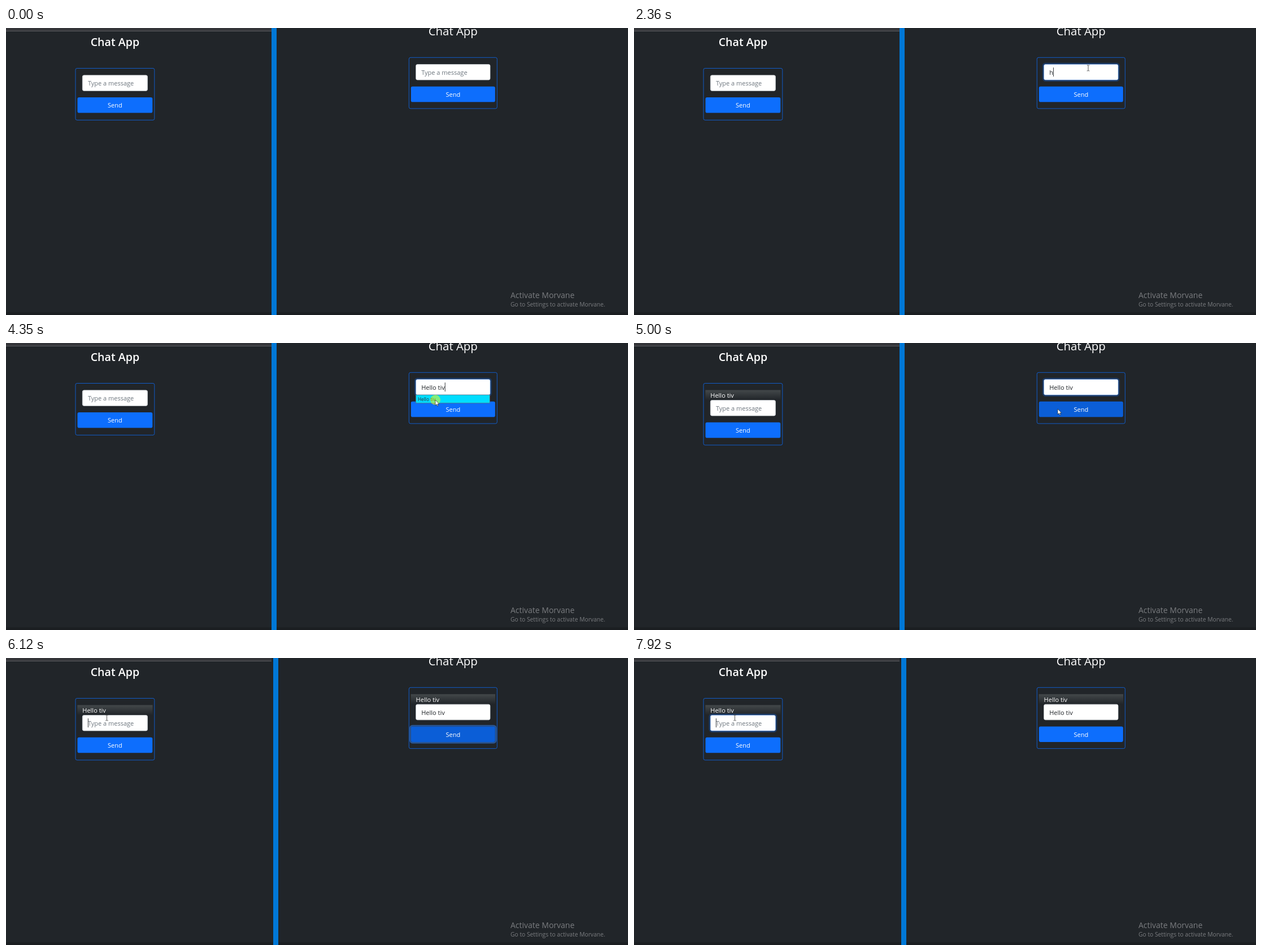
Recreate the animation shown at these times as an HTML page. Size 1101 px wide and 509 px high, loop 8000 ms.

```html
<!DOCTYPE html>
<html lang="en">
<head>
<meta charset="utf-8">
<title>Chat App</title>
<style>
  html, body { margin: 0; width: 100%; height: 100%; overflow: hidden; background: #212529; }
  svg { display: block; width: 100%; height: 100%; font-family: "Open Sans", "Noto Sans", sans-serif; }
  text { white-space: pre; }
</style>
</head>
<body>
<svg id="stage" viewBox="0 0 1101 509" preserveAspectRatio="none">
  <defs>
    <linearGradient id="fade" x1="0" y1="0" x2="0" y2="1">
      <stop offset="0" stop-color="#43484a"/>
      <stop offset="1" stop-color="#212529"/>
    </linearGradient>
  </defs>
</svg>
<script>
const LOOP = 8000;
const SHIFT = 17.7;
const ROW = 14.7;
const GREETING = "Hello tiv";
const HISTORY = ["how are you?", "hi", GREETING, "how is it going?", "hi there", "have a nice day"];
const stage = document.getElementById("stage");

function set(node, attrs) {
  for (const key in attrs) node.setAttribute(key, attrs[key]);
  return node;
}
function add(parent, tag, attrs = {}) {
  return parent.appendChild(set(document.createElementNS("http://www.w3.org/2000/svg", tag), attrs));
}
function rect(parent, x, y, width, height, attrs) {
  return add(parent, "rect", { x, y, width, height, ...attrs });
}
function label(parent, x, y, size, fill, content, attrs = {}) {
  const node = add(parent, "text", { x, y, "font-size": size, fill, ...attrs });
  node.textContent = content;
  return node;
}
function show(node, visible) {
  node.setAttribute("display", visible ? "inline" : "none");
}

// One chat form; x, y, w, h is its outline, top is the y of the input.
function makePane({ x, y, w, h, top, titleY, titleSize, weight }) {
  const mid = x + w / 2, inX = x + 12.3, inW = w - 24.6, textX = inX + 9.6;
  label(stage, mid, titleY, titleSize, "#fff", "Chat App", { "text-anchor": "middle", "font-weight": weight });
  const frame = rect(stage, x, y, w, h, { rx: 2.8, fill: "none", stroke: "#0d6efd", "stroke-width": 0.75 });
  const message = add(stage, "g");
  rect(message, x + 3.3, top - 0.3, w - 6.6, SHIFT, { fill: "url(#fade)" });
  label(message, inX, top + 13.4, 11, "#fff", GREETING);

  const body = add(stage, "g");
  const inputRing = rect(body, inX - 1.4, top - 1.4, inW + 2.8, 30.4,
    { rx: 4.2, fill: "none", stroke: "#0d6efd", "stroke-width": 2.8 });
  const input = rect(body, inX, top, inW, 27.6, { rx: 2.8, fill: "#fff", "stroke-width": 0.7 });
  const value = label(body, textX, top + 18.4, 11, "#212529", "");
  const caret = rect(body, textX, top + 5.6, 0.9, 16, { fill: "#212529" });
  const buttonRing = rect(body, x + 2.1, top + 37.9, w - 4.2, 30.2,
    { rx: 4.2, fill: "none", stroke: "#3184fd", "stroke-width": 2.8 });
  const button = rect(body, x + 3.5, top + 39.3, w - 7, 27.4, { rx: 2.8 });
  label(body, mid, top + 57.6, 11, "#fff", "Send", { "text-anchor": "middle" });

  return ({ sent, text, caretOn, focus, pressed, dark }) => {
    set(frame, { height: h + (sent ? SHIFT : 0) });
    show(message, sent);
    set(body, { transform: `translate(0 ${sent ? SHIFT : 0})` });
    set(inputRing, { opacity: focus * 0.27 });
    set(input, { stroke: focus > 0.5 ? "#86b7fe" : "#ced4da" });
    value.textContent = text || "Type a message";
    set(value, { fill: text ? "#212529" : "#6c757d" });
    show(caret, caretOn);
    set(caret, { x: textX + (text ? value.getComputedTextLength() : 0) });
    set(buttonRing, { opacity: pressed * 0.5 });
    set(button, { fill: `rgb(${13 - 2 * dark},${110 - 16 * dark},${253 - 38 * dark})` });
  };
}

// Desktop strips around the two panes
rect(stage, 0, 0, 1101, 509, { fill: "#212529" });
rect(stage, 0, 0, 470, 5.5, { fill: "#35363a" });
rect(stage, 0, 5, 470, 1, { fill: "#5b5c60" });
rect(stage, 0, 504.5, 1101, 4.5, { fill: "#1b1e21" });
const divider = rect(stage, 470, 0, 9, 509, { fill: "#0078d7" });
label(stage, 893, 479, 14, "#7b7d80", "Activate Morvane");
label(stage, 893, 494.3, 10.3, "#7b7d80", "Go to Settings to activate Morvane.");

const drawLeft = makePane({ x: 123, y: 71.5, w: 139.8, h: 91.8, top: 83.8, titleY: 32, titleSize: 19.6, weight: 600 });
const drawRight = makePane({ x: 713.3, y: 52.3, w: 156, h: 90.6, top: 64.5, titleY: 13.2, titleSize: 20.4, weight: 400 });

const popup = add(stage, "g");
const popupBox = rect(popup, 725.3, 92, 131, ROW, { fill: "#2b2a33", stroke: "#63636b", "stroke-width": 0.7 });
const rows = HISTORY.map((_, i) => label(popup, 729, 102.6 + i * ROW, 8.3, "#fbfbfe", ""));

const pulse = add(stage, "circle", { r: 9, fill: "#ffff00", opacity: 0.5 });
const arrow = add(stage, "path", {
  d: "M0 0V9.6L2.2 7.6L3.7 11L5.2 10.3L3.7 7.1H6.7Z",
  fill: "#fff", stroke: "#111", "stroke-width": 0.6
});
const beam = add(stage, "path", {
  d: "M-2.3 -5H-.6L0 -4.4L.6 -5H2.3M0 -4.4V4.4M-2.3 5H-.6L0 4.4L.6 5H2.3",
  fill: "none", stroke: "#444", "stroke-width": 0.9
});

// Pointer moves: start, end, number of steps, target x, y
const MOVES = [
  [590, 740, 4, 875.5, 132.5],
  [990, 1190, 5, 804, 71],
  [3620, 3930, 7, 760, 101],
  [4540, 4740, 5, 750, 117],
  [5150, 5350, 5, 203, 90],
  [5550, 5700, 4, 178.5, 106]
];
// Click pulses: start, end
const CLICKS = [[1600, 1700], [4350, 4450], [5050, 5150], [6170, 6270]];

const within = (t, a, b) => t >= a && t < b;
const ramp = (t, start) => Math.min(1, Math.max(0, (t - start) / 150));

function pointerAt(t) {
  let x = 1120, y = 620;
  for (const [start, end, steps, toX, toY] of MOVES) {
    if (t < start) break;
    const gap = (end - start) / (steps - 1);
    const p = Math.min(1, (Math.floor((t - start) / gap + 1e-6) + 1) / steps);
    x += (toX - x) * p;
    y += (toY - y) * p;
  }
  return { x, y };
}

function typedRight(t) {
  if (t < 2360) return "";
  if (t < 3200) return "h";
  if (t < 3290) return "he";
  if (t < 3370) return "hel";
  return t < 4350 ? "hell" : GREETING;
}

function suggestions(t) {
  if (within(t, 2460, 3120)) return HISTORY;
  if (within(t, 3120, 3200)) return HISTORY.slice(0, 1);
  return within(t, 3200, 4400) ? [GREETING] : [];
}

function drawPopup(items, { x, y }) {
  const hot = items.length === 1 && x > 725 && x < 857 && y > 92 && y < 107;
  show(popup, items.length > 0);
  set(popupBox, { height: Math.max(1, items.length) * ROW, fill: hot ? "#00ddff" : "#2b2a33" });
  rows.forEach((row, i) => {
    row.textContent = items[i] || "";
    set(row, { fill: hot ? "#2b2a33" : "#fbfbfe" });
  });
}

function drawPointer(t, { x, y }) {
  const overRight = x > 725 && x < 857 && y > 64 && y < 92;
  const overLeft = x > 135 && x < 251 && y > 101 && y < 129;
  const text = overRight || overLeft;
  show(arrow, t >= 590 && !text);
  show(beam, text);
  set(text ? beam : arrow, { transform: `translate(${x} ${y})` });
  show(pulse, CLICKS.some(([a, b]) => within(t, a, b)));
  set(pulse, { cx: x, cy: y });
}

function render(t) {
  const at = pointerAt(t);
  const hover = at.x > 717 && at.x < 866 && at.y > 103 && at.y < 131 && t < 5000;
  set(divider, { x: t < 6120 ? 470 : 473 });
  drawLeft({
    sent: t >= 5000,
    text: within(t, 6860, 7620) ? "h" : "",
    caretOn: within(t, 6120, 6660) || within(t, 6860, 7420) || t >= 7920,
    focus: ramp(t, 6120),
    pressed: 0,
    dark: 0
  });
  drawRight({
    sent: t >= 5050,
    text: typedRight(t),
    caretOn: within(t, 1600, 2110) || within(t, 2360, 2610) || within(t, 3200, 4190) || within(t, 4350, 5000),
    focus: ramp(t, 1550) - ramp(t, 5000),
    pressed: ramp(t, 5050) - ramp(t, 6120),
    dark: t >= 5000 ? 1 - ramp(t, 6120) : +hover
  });
  drawPopup(suggestions(t), at);
  drawPointer(t, at);
}

const began = performance.now();
function tick() {
  render((performance.now() - began) % LOOP);
  requestAnimationFrame(tick);
}
tick();
</script>
</body>
</html>
```
